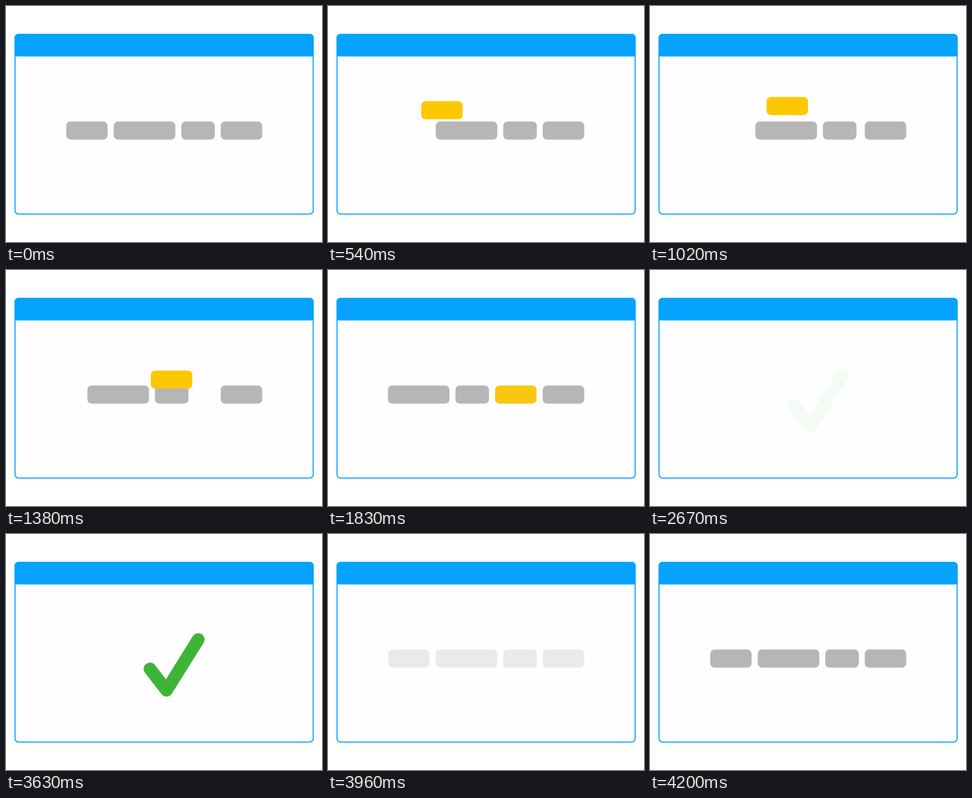
An HTML page that plays this animation: 600 px wide and 450 px high, repeating every 4.98 s.

```html
<!DOCTYPE html>
<html lang="en">
<head>
<meta charset="utf-8">
<title>Word order</title>
<style>
  html, body { margin: 0; width: 100%; height: 100%; overflow: hidden; background: #fff; }
  svg { display: block; width: 600px; height: 450px; }
</style>
</head>
<body>
<svg viewBox="0 0 600 450">
  <rect x="17.2" y="54" width="566" height="342.7" rx="6.5" fill="#fefefe" stroke="#05a2fe" stroke-width="2"/>
  <path d="M16.2 96.3V61a8 8 0 0 1 8-8H576.2a8 8 0 0 1 8 8V96.3Z" fill="#05a2fe"/>
  <path id="arc" fill="none" d="M114.3 220.3c33 -24 65 -47 101.5 -47s68.5 23 101.5 47"/>
  <g id="blocks" fill="#b6b6b6">
    <g id="pair">
      <rect x="204.6" y="220.3" width="116.9" height="34.4" rx="8"/>
      <rect x="332.8" y="220.3" width="63.7" height="34.4" rx="8"/>
    </g>
    <rect x="407.7" y="220.3" width="78.8" height="34.4" rx="8"/>
    <rect id="mover" width="78.6" height="34.4" rx="8"/>
  </g>
  <path id="check" d="M273.3 257.2L304.8 298L365 201.2" fill="none" stroke="#35b12d"
        stroke-width="24" stroke-linecap="round" stroke-linejoin="round"/>
</svg>
<script>
const LOOP = 4980, SHIFT = -90.8;
const GREY = [182, 182, 182], YELLOW = [255, 199, 0];
const [arc, blocks, pair, mover, check] =
  ['arc', 'blocks', 'pair', 'mover', 'check'].map(id => document.getElementById(id));
const arcLength = arc.getTotalLength();

const ramp = (t, from, to) => Math.min(1, Math.max(0, (t - from) / (to - from)));
const ease = (t, from, to) => { const p = ramp(t, from, to); return p * p * (3 - 2 * p); };

function draw(t) {
  const moving = t < 2640; // blocks return to their start while hidden
  const rise = moving ? ease(t, 0, 900) : 0;
  const fall = moving ? ease(t, 900, 1800) : 0;
  const spot = arc.getPointAtLength(arcLength * (rise + fall) / 2);
  mover.setAttribute('x', spot.x);
  mover.setAttribute('y', spot.y);
  pair.setAttribute('transform', `translate(${SHIFT * fall} 0)`);

  const tint = ramp(t, 0, 360) - ramp(t, 1800, 2160);
  mover.setAttribute('fill', `rgb(${GREY.map((c, i) => Math.round(c + (YELLOW[i] - c) * tint))})`);

  blocks.setAttribute('opacity', 1 - ease(t, 2160, 2640) + ease(t, 3840, 4200));
  check.setAttribute('opacity', ease(t, 2640, 2880) - ease(t, 3600, 3840));
}

const start = performance.now();
function tick() {
  draw((performance.now() - start) % LOOP);
  requestAnimationFrame(tick);
}
tick();
</script>
</body>
</html>
```
